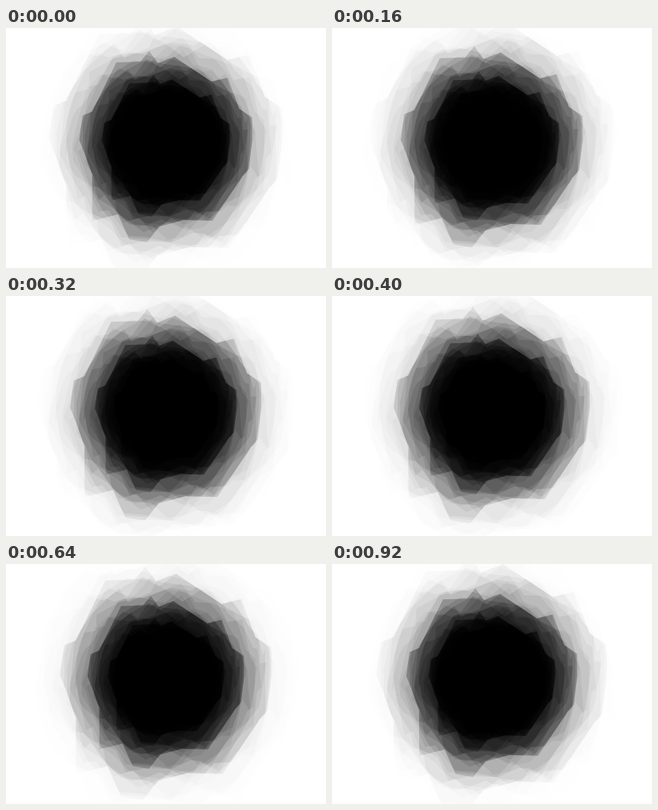
Recreate the animation shown at these times as an HTML page with a canvas. Size 400 by 300 pixels, loop 0.96 s.

```html
<!DOCTYPE html>
<html lang="en">
<head>
<meta charset="utf-8">
<title>Jagged tunnel</title>
<style>
  html, body { margin: 0; width: 100%; height: 100%; overflow: hidden; background: #fff; }
  canvas { display: block; }
</style>
</head>
<body>
<canvas id="stage" width="400" height="300"></canvas>
<script>
const ctx = document.getElementById('stage').getContext('2d');
const CX = 200, CY = 144;
const LOOP = 960;
const GROWTH = 1.35; // zoom per loop
const RING_COUNT = 8, RING_POINTS = 32;
const BOLD_RADIUS = 108, BOLD_WEIGHT = 4;

let seed = 29;
const random = () => (seed = seed * 16807 % 2147483647) / 2147483647;
const jitter = amount => (random() * 2 - 1) * amount;

// Outlines are unit rings around the centre; the rock is rough mostly vertically.
function roughPoint(angle) {
  return [Math.cos(angle) * (1 + jitter(0.035)), Math.sin(angle) + jitter(0.13)];
}

function roughRing() {
  return Array.from({ length: RING_POINTS }, (_, i) =>
    roughPoint((i + jitter(0.4)) / RING_POINTS * Math.PI * 2));
}

// The boldest ring has a few set spikes above and below, and rough sides.
function boldRing() {
  const unit = ([x, y]) => [(x - CX) / BOLD_RADIUS, (y - CY) / BOLD_RADIUS];
  const side = middle => [-0.5, -0.25, 0, 0.25, 0.5].map(a => roughPoint(middle + a));
  const top = [[138, 43], [168, 42], [179, 29], [190, 44], [210, 36], [257, 67], [277, 62]];
  const bottom = [[258, 241], [222, 240], [192, 248], [176, 268], [154, 264], [140, 233], [108, 241]];
  return [...top.map(unit), ...side(0), ...bottom.map(unit), ...side(Math.PI)];
}

const rings = [{ radius: BOLD_RADIUS, weight: BOLD_WEIGHT, points: boldRing() }];
for (let i = 0; i < RING_COUNT; i++) {
  rings.push({ radius: 100 * GROWTH ** (i / RING_COUNT), weight: 1, points: roughRing() });
}
const totalWeight = RING_COUNT + BOLD_WEIGHT;

const sheets = [];
for (let cycle = -3; cycle <= 2; cycle++) {
  for (const ring of rings) {
    sheets.push({ ...ring, radius: ring.radius * GROWTH ** cycle });
  }
}
sheets.sort((a, b) => a.radius - b.radius);

// Fog thickens towards the viewer and is shared among the sheets by weight.
function opacity(radius, weight) {
  const density = 10.8 * (Math.max(0, radius - 58) / 73) ** 2;
  return 1 - Math.exp(-density * Math.log(GROWTH) * weight / totalWeight);
}

function drawSheet({ radius, weight, points }, zoom) {
  const size = radius * zoom;
  ctx.beginPath();
  ctx.rect(0, 0, 400, 300);
  points.forEach(([x, y], i) => {
    ctx[i ? 'lineTo' : 'moveTo'](CX + x * size, CY + y * size);
  });
  ctx.closePath();
  ctx.fillStyle = `rgba(255, 255, 255, ${opacity(size, weight).toFixed(4)})`;
  ctx.fill('evenodd');
}

function draw(now) {
  const zoom = GROWTH ** (now % LOOP / LOOP);
  ctx.fillStyle = '#000';
  ctx.fillRect(0, 0, 400, 300);
  for (const sheet of sheets) drawSheet(sheet, zoom);
}

function tick() {
  draw(performance.now());
  requestAnimationFrame(tick);
}
tick();
</script>
</body>
</html>
```
